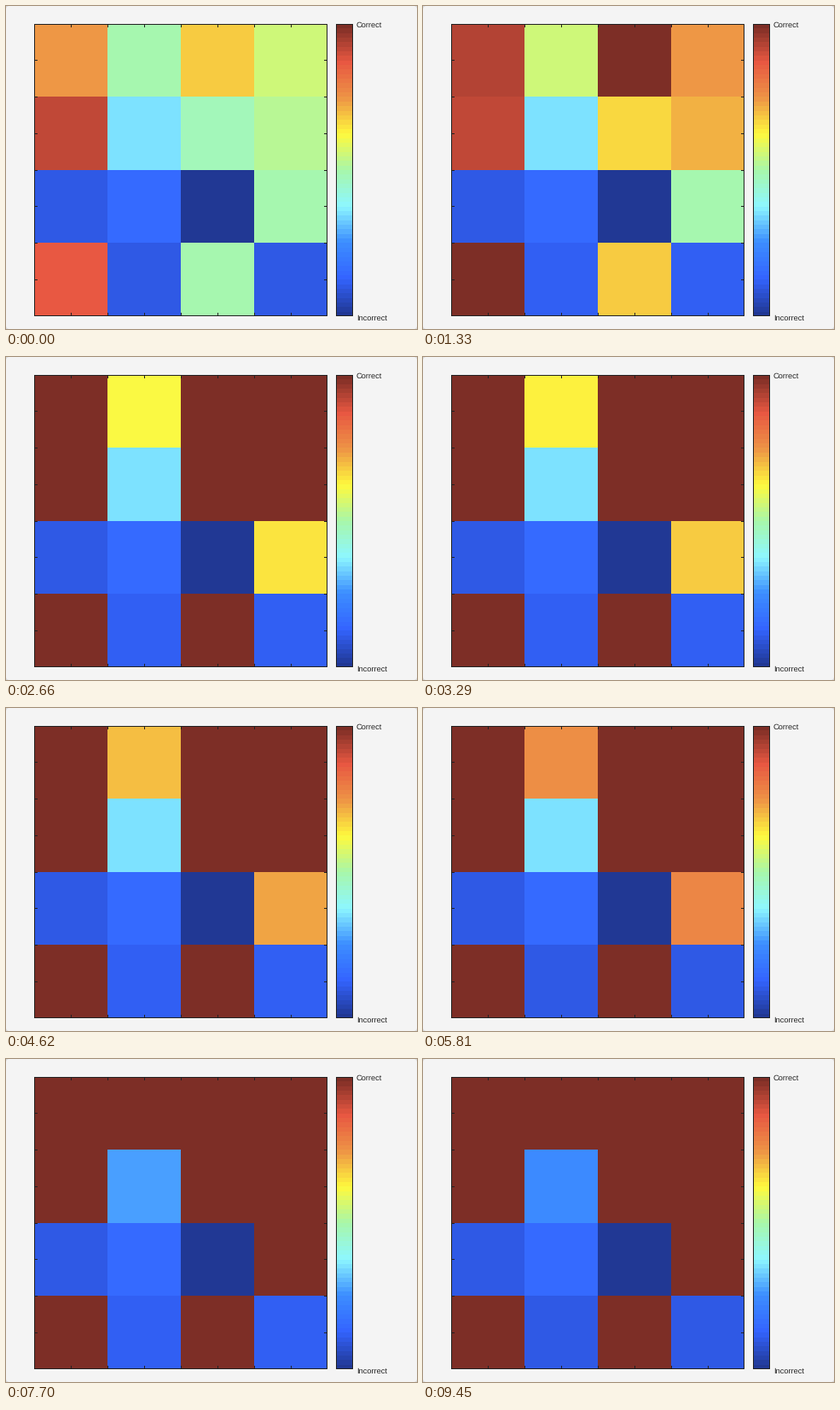
A matplotlib script that plays this animation: 482 px wide and 378 px high, repeating every 9660 ms.

```python
import numpy as np
import matplotlib.pyplot as plt
from matplotlib.animation import FuncAnimation
from matplotlib.colors import LinearSegmentedColormap
from matplotlib.patches import FancyBboxPatch, Rectangle

W, H, DPI = 482, 378, 64
STEP, LOOP = 70, 9660
PX = 72 / DPI  # points per pixel
LEFT, RIGHT, TOP, BOTTOM = 33, 377, 21, 363
BAR_LEFT, BAR_RIGHT = 387, 407
INK = "#222222"

STOPS = ["#213894", "#3464ff", "#3d8fff", "#8ef8ff", "#a8f7aa",
         "#fffa3e", "#ee946", "#e85842", "#7d2e26"]
STOPS[6] = "#ee9446"
cmap = LinearSegmentedColormap.from_list("softjet", STOPS, N=64)

# Steps at which the scores are refreshed.
UPDATES = [1, 8, 15, 23, 27, 31, 36, 44, 54, 62,
           64, 69, 73, 77, 82, 92, 100, 107, 110, 112]
LATE = 15  # after this many updates the slow learners succeed

START = np.array([[.745, .495, .68, .56],
                  [.92, .35, .47, .52],
                  [.10, .145, 0, .485],
                  [.87, .10, .495, .10]])
KINDS = ["fsrf", "ldff", "hhhl", "fwfw"]

# How a score v has changed after n updates.
RULES = {
    "f": lambda v, n: v + .021 * n**2,                                # fast
    "r": lambda v, n: v + .04 * n**2,                                 # rush
    "s": lambda v, n: v + .018 * n + (n > LATE),                      # slow
    "l": lambda v, n: v + .085 * max(n - 3, 0)**.5 + (n > LATE),      # late
    "d": lambda v, n: v - .021 * max(n - LATE, 0),                    # decline
    "w": lambda v, n: v + .015 * (n % 5 > 0),                         # waver
    "h": lambda v, n: v,                                              # hold
}


def scores(n):
    grid = [[RULES[k](v, n) for k, v in zip(kinds, row)]
            for kinds, row in zip(KINDS, START)]
    return np.clip(grid, 0, 1)


plt.rcParams["text.hinting"] = "none"
fig = plt.figure(figsize=(W / DPI, H / DPI), dpi=DPI, facecolor="#d8d8d8")
ax = fig.add_axes([0, 0, 1, 1])
ax.axis("off")
ax.add_patch(FancyBboxPatch((0, 0), W, H, fc="#f4f4f4", ec="none",
                            boxstyle="round,pad=0,rounding_size=4"))


def panel(data, x0, x1):
    """Coloured grid with a one-pixel border."""
    ax.add_patch(Rectangle((x0 + .5, TOP + .5), x1 - x0 - 1, BOTTOM - TOP - 1,
                           fill=False, ec=INK, lw=PX, snap=False, zorder=4))
    return ax.imshow(data, extent=(x0, x1, BOTTOM, TOP), cmap=cmap, vmin=0,
                     vmax=1, interpolation="nearest", aspect="auto", zorder=2)


def tick(xs, ys):
    ax.plot(xs, ys, color=INK, lw=PX, snap=False, zorder=4,
            solid_capstyle="butt")


heat = panel(scores(0), LEFT, RIGHT)
panel(np.linspace(1, 0, 64)[:, None], BAR_LEFT, BAR_RIGHT)
ax.set(xlim=(0, W), ylim=(H, 0))

for f in np.arange(1, 8) / 8:
    x = int(LEFT + f * (RIGHT - LEFT)) + .5
    y = int(TOP + f * (BOTTOM - TOP)) + .5
    for edge, d in ((TOP, 4), (BOTTOM, -4)):
        tick([x, x], [edge, edge + d])
    for edge, d in ((LEFT, 4), (RIGHT, -4)):
        tick([edge, edge + d], [y, y])

for label, base in (("Correct", 25), ("Incorrect", 368)):
    ax.text(411, base, label, family="Liberation Sans", size=9.2 * PX,
            color=INK, va="baseline", ha="left")


def draw(i):
    heat.set_data(scores(int(np.searchsorted(UPDATES, i, side="right"))))
    return [heat]


anim = FuncAnimation(fig, draw, frames=LOOP // STEP, interval=STEP,
                     repeat=True, repeat_delay=0, blit=False)
plt.show()
```
